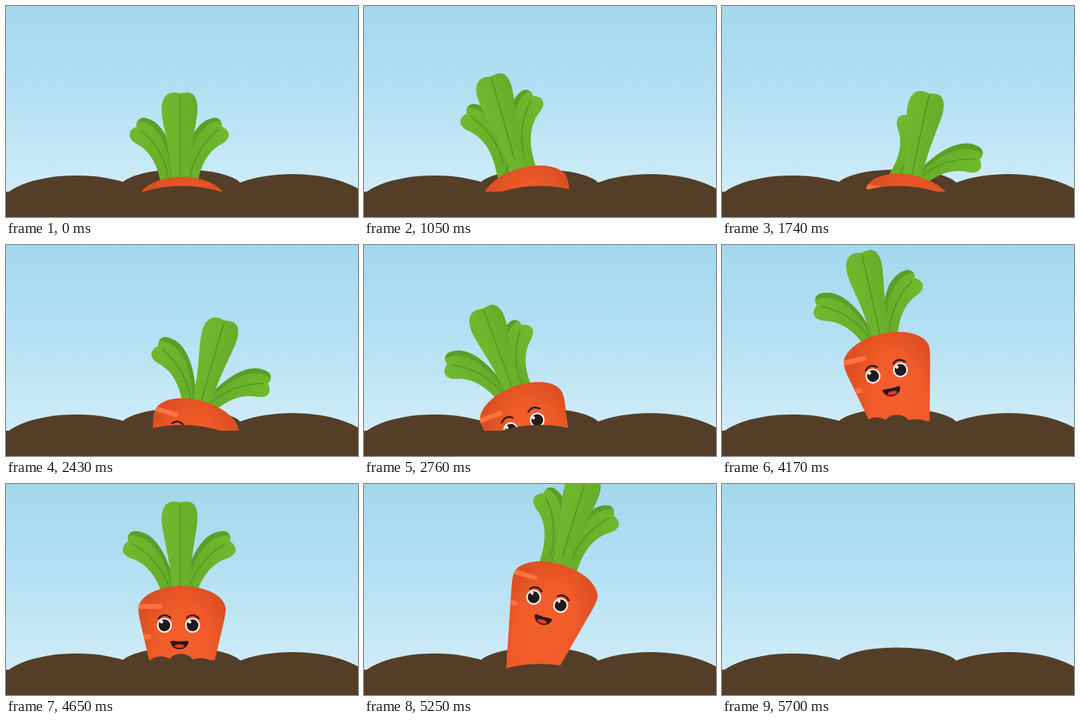
An HTML page for the animation above (6.3 s loop, 500 by 300 pixels).

```html
<!DOCTYPE html>
<html lang="en">
<head>
<meta charset="utf-8">
<title>Carrot</title>
<style>
  html, body { margin: 0; width: 100%; height: 100%; overflow: hidden; }
  svg { display: block; width: 100vw; height: 100vh; }
  .soil { fill: #543e27; }
  .vein { fill: none; stroke: #519a22; stroke-width: 1.8; stroke-linecap: round; }
  .shine { fill: #ff7340; }
  .brow { fill: none; stroke: #2b1719; stroke-width: 2.4; stroke-linecap: round; }
</style>
</head>
<body>
<svg viewBox="0 0 500 300" preserveAspectRatio="none">
  <defs>
    <linearGradient id="sky" x1="0" y1="0" x2="0" y2="1">
      <stop offset="0" stop-color="#a2d8ed"/>
      <stop offset=".4" stop-color="#b3dff3"/>
      <stop offset=".8" stop-color="#cbeaf7"/>
      <stop offset="1" stop-color="#d2eef8"/>
    </linearGradient>
    <linearGradient id="leafFill">
      <stop offset="0" stop-color="#71b92e"/>
      <stop offset="1" stop-color="#67ac28"/>
    </linearGradient>
    <radialGradient id="skin" gradientUnits="userSpaceOnUse" cx="0" cy="0" r="1"
      gradientTransform="translate(2 95) scale(66 110)">
      <stop offset="0" stop-color="#f4602b"/>
      <stop offset=".6" stop-color="#f05b29"/>
      <stop offset="1" stop-color="#dd4f22"/>
    </radialGradient>
    <path id="bodyShape" d="M-62,33 C-62,14.8 -34,0 0,0 S62,14.8 62,33 Q62,40 60,48 L23,208 C17,240 11,261 0,261 S-17,240 -23,208 L-60,48 Q-62,40 -62,33Z"/>
    <clipPath id="bodyClip"><use href="#bodyShape"/></clipPath>
    <g id="side">
      <path fill="#5a9f27" d="M-24,24 L-30,6 C-38,-16 -52,-32 -68,-38 C-78,-41 -85,-46 -84,-53 C-83,-58 -79,-62 -76,-63 C-79,-70 -75,-78 -67,-78 C-40,-78 -20,-48 -9,6 L-8,24Z"/>
      <path fill="url(#leafFill)" d="M-24,24 L-30,6 C-38,-16 -52,-32 -68,-38 C-78,-41 -85,-46 -84,-53 C-83,-58 -79,-62 -76,-63 Q-78,-69 -74,-72 C-46,-73 -24,-44 -14,6 L-13,24Z"/>
      <path class="vein" d="M-70,-60 C-46,-46 -28,-26 -18,3"/>
    </g>
    <g id="eye">
      <circle r="10.6" fill="#fff"/>
      <g id="pupil">
        <circle r="8.4" fill="#201a1c"/>
        <circle cx="-4" cy="-5" r="2.3" fill="#fff"/>
      </g>
    </g>
  </defs>

  <rect width="500" height="300" fill="url(#sky)"/>
  <g class="soil">
    <ellipse cx="100" cy="286" rx="110" ry="45"/>
    <ellipse cx="249" cy="257" rx="86" ry="24.5"/>
    <ellipse cx="407" cy="289" rx="115" ry="50"/>
  </g>

  <g id="carrot">
    <g id="leaves">
      <g id="left"><use href="#side"/></g>
      <g id="right"><use href="#side" transform="translate(-8) scale(-1 1)"/></g>
      <path fill="url(#leafFill)" d="M-13,24 L-14,6 C-18,-50 -29,-75 -29,-96 C-29,-112 -22,-120 -12,-120 Q-6,-120 -3,-118.5 Q0,-120 9,-120 C17,-119 22,-112 22,-97 C21,-75 13,-50 11,6 L10,24Z"/>
      <path class="vein" d="M-2.5,-116 V3"/>
    </g>
    <use href="#bodyShape" fill="url(#skin)"/>
    <g clip-path="url(#bodyClip)">
      <rect class="shine" x="-75" y="25.5" width="47" height="7" rx="3.5"/>
      <rect class="shine" x="-75" y="68.5" width="31" height="7" rx="3.5"/>
    </g>
    <use href="#eye" x="-25" y="56"/>
    <use href="#eye" x="15" y="56"/>
    <g id="brows">
      <path class="brow" d="M-33.5,46 Q-25,37.5 -16.5,45"/>
      <path class="brow" d="M7,45 Q15.5,37.5 24,46"/>
    </g>
    <path fill="#2b1517" d="M-14,78 Q-4,79.5 7,78 Q10,78 9,81 C6,93 -13,93 -16,81 Q-17,78 -14,78Z"/>
    <ellipse cx="-3.5" cy="85.5" rx="7" ry="2.8" fill="#dc3b2c"/>
  </g>

  <g class="soil">
    <rect y="264" width="500" height="36"/>
    <path d="M192,265 Q250,246.5 308,265Z"/>
    <g id="clods">
      <rect x="172" y="250.5" width="156" height="20"/>
      <ellipse cx="220" cy="254" rx="16" ry="9"/>
      <ellipse cx="248.5" cy="253" rx="17" ry="11.5"/>
      <ellipse cx="276" cy="255.5" rx="17" ry="8"/>
    </g>
  </g>
</svg>

<script>
const LOOP = 6300, STEP = 30;

// Each track is written as "time value" pairs
const track = text => text.split(", ").map(pair => pair.split(" ").map(Number));

const tilt = track("0 0, 30 0, 300 16, 450 20, 870 -19, 1050 -16, 1290 -14, 1590 -14, 1740 12, 1920 17, 2250 15, 2400 15, 2550 26, 2730 -23, 2880 4, 3000 0, 3840 0, 4125 -17, 4290 7, 4450 -3, 4650 0, 4950 0, 5130 26, 5430 0, 6300 0");
const height = track("0 243, 30 243, 300 233, 720 240, 1050 231, 1290 232, 1590 232, 1740 241, 2250 223, 2400 223, 2550 212, 2880 199, 3000 203, 3810 203, 3900 208, 4125 125, 4450 148, 4650 145, 4950 145, 5130 150, 5280 100, 5610 -208, 5700 -264, 6300 -300");
const squeeze = track("0 10, 30 10, 300 18, 600 -6, 1050 19, 1290 -8, 1590 -8, 1740 10, 2250 -10, 2400 -10, 2880 14, 3000 0, 3840 0, 4020 14, 4125 0, 4950 0, 5280 17, 6300 17");
const sway = track("0 0, 300 0, 450 10, 870 -8, 1050 2, 1290 0, 1590 0, 1740 30, 2250 2, 2400 2, 2550 18, 2730 -12, 3000 0, 3900 0, 4125 -6, 4290 4, 4650 0, 4950 0, 5130 14, 5280 0, 6300 0");
const brow = track("0 4, 3900 4, 4125 0, 6300 0");
const look = track("0 0, 3450 0, 3540 -2, 3630 -2, 3720 2, 3810 2, 3870 0, 6300 0");
const sink = track("0 24, 3930 24, 4050 0, 5010 0, 5160 24, 6300 24");

function slope(keys, i) {
  if (i < 1 || i > keys.length - 2) return 0;
  const rate = k => (keys[k + 1][1] - keys[k][1]) / (keys[k + 1][0] - keys[k][0]);
  const a = rate(i - 1), b = rate(i);
  return a * b <= 0 ? 0 : 2 * a * b / (a + b);
}

// Smooth curve through the keys that never overshoots them
function sample(keys, t) {
  let i = 0;
  while (i < keys.length - 2 && t >= keys[i + 1][0]) i++;
  const [t0, a] = keys[i], [t1, b] = keys[i + 1];
  const d = t1 - t0, u = (t - t0) / d, v = 1 - u;
  return v * v * (1 + 2 * u) * a + u * u * (3 - 2 * u) * b
    + d * u * v * (v * slope(keys, i) - u * slope(keys, i + 1));
}

const move = (id, value) => document.getElementById(id).setAttribute("transform", value);

function draw(t) {
  const lean = sample(tilt, t), bend = sample(sway, t), pinch = sample(squeeze, t);
  move("carrot", `translate(${250 + 1.85 * lean} ${sample(height, t)}) rotate(${lean})`);
  move("leaves", `translate(0 ${-2 * Math.max(0, pinch - 10)})`);
  move("left", `rotate(${bend + pinch} -25 0)`);
  move("right", `rotate(${bend - pinch} 17 0)`);
  move("brows", `translate(0 ${-sample(brow, t)})`);
  move("pupil", `translate(${sample(look, t)} 0)`);
  move("clods", `translate(0 ${sample(sink, t)})`);
}

const start = performance.now();
function frame() {
  const t = (performance.now() - start) % LOOP;
  draw(Math.floor(t / STEP) * STEP);
  requestAnimationFrame(frame);
}
frame();
</script>
</body>
</html>
```
